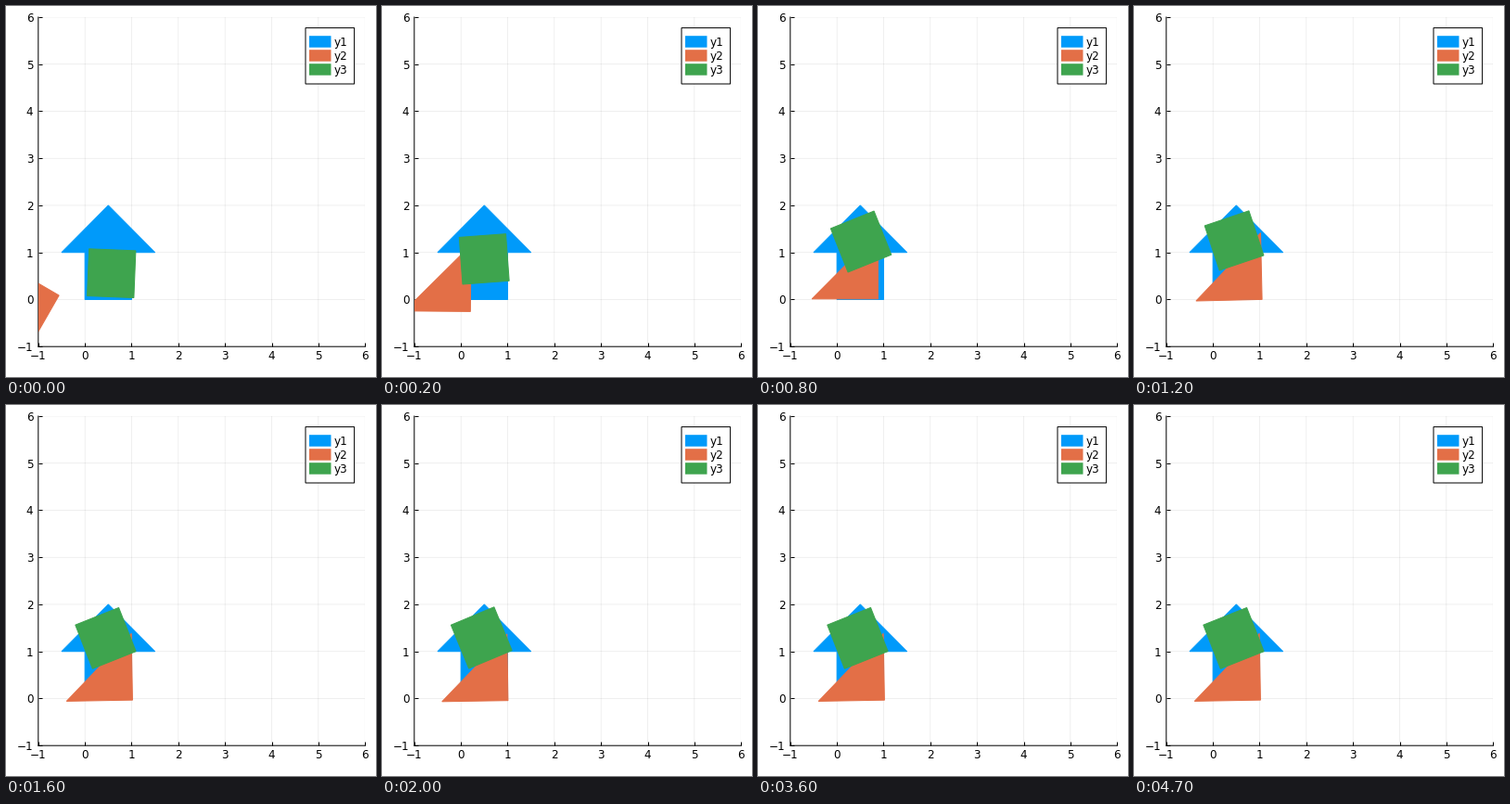
A matplotlib script that plays this animation: 399x400 px, repeating every 10000 ms.

```python
import numpy as np
import matplotlib.pyplot as plt
from matplotlib.animation import FuncAnimation
from matplotlib.patches import Polygon, Rectangle

W, H, DPI = 399, 400, 64
PX = 72 / DPI  # points per pixel
LEFT, RIGHT, TOP, BOTTOM = 34.8, 387.2, 12, 367.2
BLUE, ORANGE, GREEN = "#009afa", "#e36f47", "#3ea44e"
FRAMES, INTERVAL = 100, 100

plt.rcParams["font.family"] = "DejaVu Sans"
plt.rcParams["font.size"] = 12 * PX

HOUSE = [(0, 0), (1, 0), (1, 1), (1.5, 1), (0.5, 2), (-0.5, 1), (0, 1)]
TRIANGLE = np.array([(0, -2 / 3), (1, 1 / 3), (-1, 1 / 3)])
SQUARE = np.array([(-0.5, -0.5), (0.5, -0.5), (0.5, 0.5), (-0.5, 0.5)])

# Key poses: x, y, degrees of the triangle, then of the square
STRIDE = 4
KEYS = np.array([
    (-1.20, -0.085, 105, 0.568, 0.557, -2.3),
    (0.457, 0.460, 2.2, 0.451, 1.108, 10.5),
    (0.407, 0.484, 45, 0.515, 1.230, 21.8),
    (0.570, 0.462, 46.3, 0.455, 1.252, 18.5),
])
REST = np.array((0.539, 0.430, 46, 0.443, 1.282, 21.6))
SLOPES = np.gradient(KEYS, axis=0)


def pose(step):
    """Cubic path through the key poses, then a damped swing to rest."""
    i, u = divmod(step / STRIDE, 1)
    i = int(i)
    if i >= len(KEYS) - 1:
        t = step - STRIDE * (len(KEYS) - 1)
        return REST + (KEYS[-1] - REST) * np.exp(-0.15 * t) * np.cos(np.pi * t / 8)
    ease = u * u * (3 - 2 * u)
    return (KEYS[i] * (1 - ease) + KEYS[i + 1] * ease
            + u * (1 - u) * (SLOPES[i] * (1 - u) - SLOPES[i + 1] * u))


def place(shape, x, y, degrees):
    a = np.radians(degrees)
    turn = np.array([(np.cos(a), np.sin(a)), (-np.sin(a), np.cos(a))])
    return shape @ turn + (x, y)


def add_shape(points, color, z):
    patch = Polygon(points, facecolor=color, edgecolor=color,
                    linewidth=PX, joinstyle="miter", zorder=z, snap=False)
    return ax.add_patch(patch)


fig = plt.figure(figsize=(W / DPI, H / DPI), dpi=DPI, facecolor="white")
ax = fig.add_axes([LEFT / W, 1 - BOTTOM / H,
                   (RIGHT - LEFT) / W, (BOTTOM - TOP) / H])
ax.set(xlim=(-1, 6), ylim=(-1, 6), xticks=range(-1, 7), yticks=range(-1, 7))
ax.set_axisbelow(True)
ax.grid(color="black", alpha=0.1, linewidth=0.6 * PX, snap=False)
ax.tick_params(direction="in", length=4 * PX, width=PX)
ax.tick_params(axis="x", pad=4 * PX)
ax.tick_params(axis="y", pad=5.5 * PX)
for side, spine in ax.spines.items():
    spine.set(linewidth=PX, zorder=1, snap=False,
              visible=side in ("left", "bottom"))

add_shape(HOUSE, BLUE, 3)
triangle = add_shape(TRIANGLE, ORANGE, 4)
square = add_shape(SQUARE, GREEN, 5)

# Legend in pixel coordinates
key = fig.add_axes([0, 0, 1, 1])
key.set(xlim=(0, W), ylim=(H, 0))
key.axis("off")
key.add_patch(Rectangle((323, 23.6), 52.6, 60.4, facecolor="white",
                        edgecolor="black", linewidth=PX, snap=False))
for n, color in enumerate((BLUE, ORANGE, GREEN)):
    y = 38.7 + 15 * n
    key.add_patch(Rectangle((327, y - 6.5), 23.5, 12.5, color=color,
                            linewidth=0, snap=False))
    key.text(354, y + 4.3, f"y{n + 1}", va="baseline")


def update(frame):
    p = pose(frame)
    triangle.set_xy(place(TRIANGLE, *p[:3]))
    square.set_xy(place(SQUARE, *p[3:]))
    return triangle, square


anim = FuncAnimation(fig, update, frames=FRAMES, interval=INTERVAL,
                     repeat=True, repeat_delay=0)
plt.show()
```
